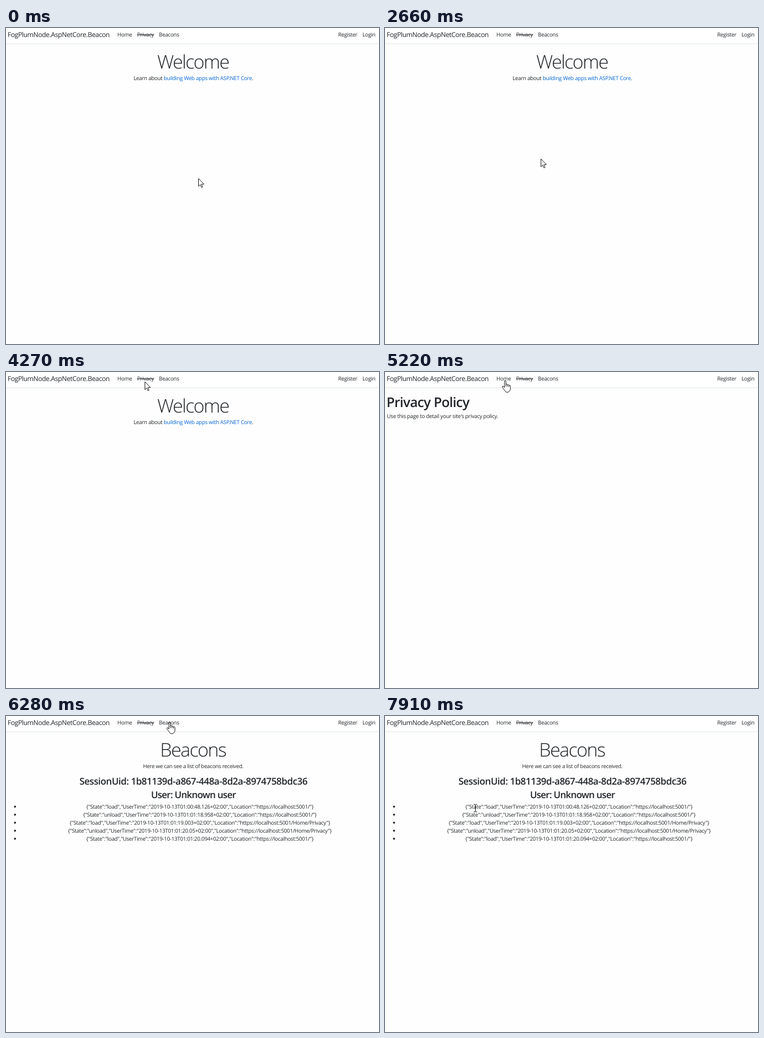
Write an HTML page that moves like this. It is 745x631 px and loops after 8 s.

```html
<!DOCTYPE html>
<html lang="en">
<head>
<meta charset="utf-8">
<title>Beacon demo</title>
<style>
  html, body { margin: 0; width: 100%; height: 100%; overflow: hidden; background: #fefefe; }
  svg { display: block; width: 100%; height: 100%; }
  text {
    font: 10.72px "Open Sans", "Noto Sans", sans-serif;
    letter-spacing: -.026em;
    fill: #212529;
    text-rendering: geometricPrecision;
    white-space: pre;
  }
  .brand { font-size: 13.4px; letter-spacing: -.033em; }
  .display { font-size: 37.5px; font-weight: 300; letter-spacing: -.046em; }
  .title { font-size: 26.8px; font-weight: 600; letter-spacing: -.027em; }
  .heading { font-size: 18.76px; font-weight: 600; letter-spacing: -.027em; }
  .tight { letter-spacing: -.042em; }
  .mid { text-anchor: middle; }
  .strike { text-decoration: line-through; }
  .link { fill: #0366d6; }
  .page, #cursor > * { display: none; }
  .page.on, #cursor > .on { display: inline; }
  #beacons .row { letter-spacing: -.028em; }
  #cursor { fill: #fff; stroke: #000; stroke-width: 1; stroke-linejoin: round; }
</style>
</head>
<body>
<svg viewBox="0 0 745 631">
  <rect width="745" height="31" fill="#fff"/>
  <rect y="31" width="745" height="1" fill="#dee2e6"/>
  <text class="brand" x="3.2" y="18">FogPlumNode.AspNetCore.Beacon</text>
  <text x="222.6" y="17">Home</text>
  <text class="strike" x="262" y="17">Privacy</text>
  <text x="305.5" y="17">Beacons</text>
  <text x="663.4" y="17">Register</text>
  <text x="712" y="17">Login</text>

  <g class="page" id="home">
    <text class="display mid" x="373.500" y="81">Welcome</text>
    <text class="mid" x="374.3" y="104">Learn about <tspan class="link">building Web apps with ASP.NET Core</tspan>.</text>
  </g>

  <g class="page" id="privacy">
    <text class="title" x="3" y="70">Privacy Policy</text>
    <text x="3.8" y="92">Use this page to detail your site's privacy policy.</text>
  </g>

  <g class="page" id="beacons">
    <text class="display mid" x="373.500" y="81">Beacons</text>
    <text class="mid" x="374" y="104">Here we can see a list of beacons received.</text>
    <text class="heading mid" x="374.3" y="137">SessionUid: 1b81139d-a867-448a-8d2a-8974758bdc36</text>
    <text class="heading tight mid" x="374.3" y="164">User: Unknown user</text>
  </g>

  <g id="cursor">
    <path id="arrow" d="M.5.5V16.2L4 12.8L6.4 18.4L8.7 17.4L6.3 11.9H11.5Z"/>
    <path id="hand" d="M-1.5 14V2a1.5 1.5 0 0 1 3 0V8.5a1.5 1.5 0 0 1 3 0v1a1.5 1.5 0 0 1 3 .5v.8a1.5 1.5 0 0 1 3 .7V16q0 3-2 5Q7.5 23.5 4 23.5T0 21L-5 14.5q-1.5-2.5 0-3.3q1.5-.4 3.5 2.8ZM1.5 8.5V12M4.5 9.5V12M7.5 10.8V13"/>
    <path id="beam" fill="none" d="M0 .5H3M4 .5H7M3.5 1V15M0 15.5H3M4 15.5H7"/>
  </g>
</svg>
<script>
const LOOP = 8000;
const byId = id => document.getElementById(id);

const pages = [[0, 'home'], [4420, 'privacy'], [5490, 'home'], [6280, 'beacons']];

// Start time, cursor shape, hotspot x and y
const moves = [
  [0, 'arrow', 384, 300], [150, 'arrow', 383, 300], [1690, 'arrow', 382, 300],
  [1840, 'arrow', 368, 293], [1960, 'arrow', 349, 286], [2110, 'arrow', 339, 285],
  [2510, 'arrow', 312, 261], [2660, 'arrow', 311, 261],
  [3060, 'arrow', 246, 176], [3180, 'arrow', 191, 104],
  [3330, 'arrow', 204, 80], [3450, 'arrow', 232, 54], [3570, 'arrow', 262, 36], [3690, 'arrow', 278, 30],
  [3840, 'hand', 277, 25], [4120, 'hand', 277, 19], [4270, 'arrow', 277, 19], [4950, 'hand', 277, 19],
  [5090, 'hand', 256, 18], [5220, 'hand', 240, 17],
  [5760, 'hand', 264, 15], [5880, 'hand', 300, 13], [6010, 'hand', 327, 12],
  [6580, 'arrow', 306, 80], [6710, 'arrow', 275, 160], [6860, 'beam', 259, 177],
  [7010, 'beam', 238, 200], [7140, 'beam', 216, 216], [7260, 'beam', 222, 224],
  [7410, 'beam', 210, 198], [7530, 'beam', 196, 169], [7650, 'beam', 186, 181],
  [7770, 'beam', 183, 190], [7910, 'beam', 177, 176]
];

const beacons = [
  ['load', '00:48.126', ''],
  ['unload', '01:18.958', ''],
  ['load', '01:19.003', 'Home/Privacy'],
  ['unload', '01:20.05', 'Home/Privacy'],
  ['load', '01:20.094', '']
];

function add(parent, tag, attrs, text = '') {
  const node = document.createElementNS('http://www.w3.org/2000/svg', tag);
  for (const name in attrs) node.setAttribute(name, attrs[name]);
  node.textContent = text;
  parent.append(node);
}

beacons.forEach(([State, time, path], i) => {
  const y = 181 + 16 * i;
  const UserTime = `2019-10-13T01:${time}+02:00`;
  const Location = `https://localhost:5001/${path}`;
  add(byId('beacons'), 'circle', { cx: 18, cy: y, r: 2, fill: '#212529' });
  add(byId('beacons'), 'text', { class: 'row mid', x: 387.2, y: y + 4 },
    JSON.stringify({ State, UserTime, Location }));
});

const current = (steps, t) => steps.findLast(step => step[0] <= t);

function show(selector, id) {
  document.querySelectorAll(selector).forEach(node => node.classList.toggle('on', node.id === id));
}

function draw() {
  const t = performance.now() % LOOP;
  const [, shape, x, y] = current(moves, t);
  show('.page', current(pages, t)[1]);
  show('#cursor > *', shape);
  byId('cursor').setAttribute('transform', `translate(${x} ${y})`);
  requestAnimationFrame(draw);
}
draw();
</script>
</body>
</html>
```
